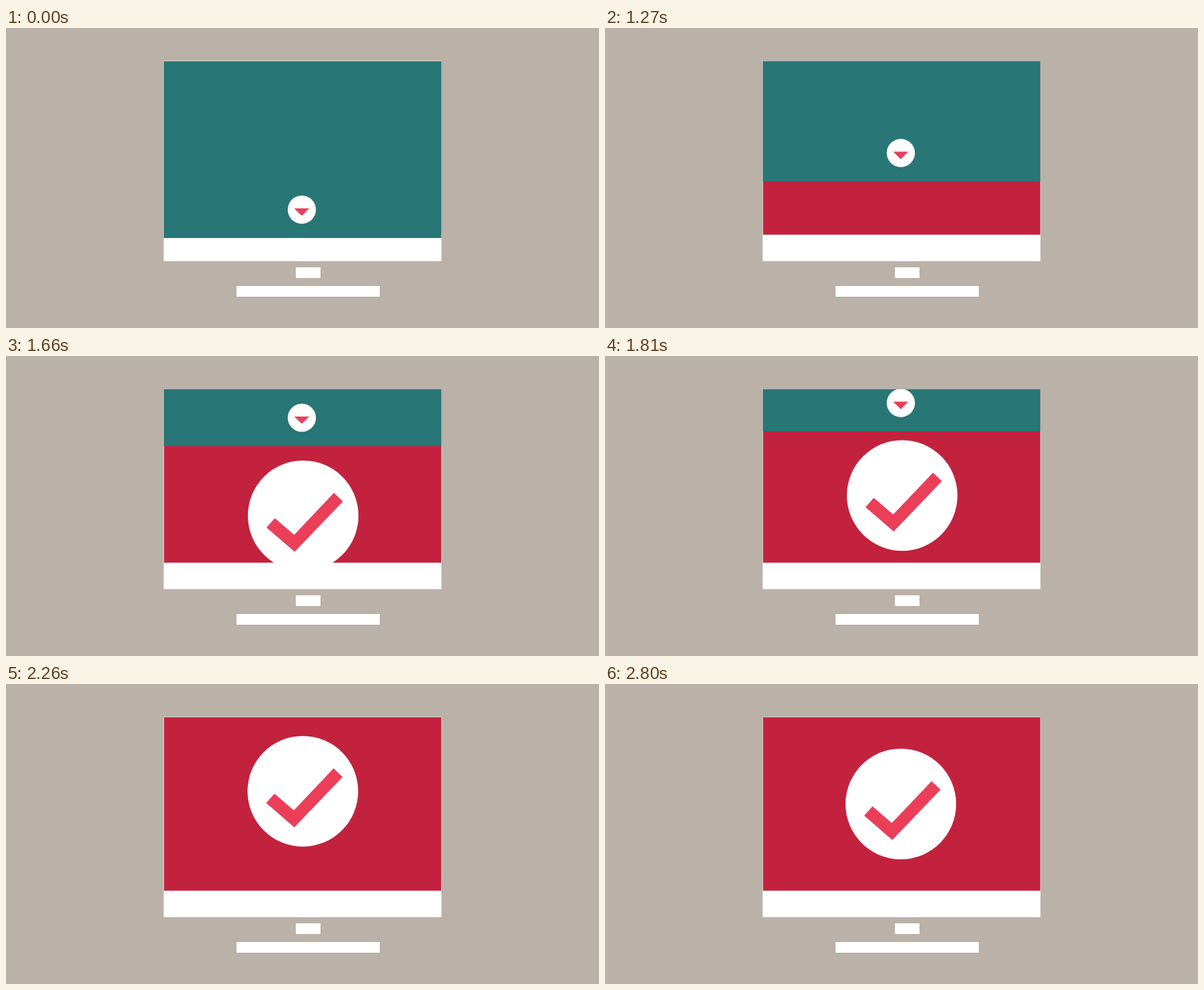
These frames come from a looping animation (890x450 px, 3590 ms). An HTML page:

```html
<!DOCTYPE html>
<html lang="en">
<head>
<meta charset="utf-8">
<title>Sliding screen</title>
<style>
  html, body { margin: 0; width: 100%; height: 100%; overflow: hidden; background: #bab1a8; }
  svg { display: block; }
</style>
</head>
<body>
<svg width="890" height="450" viewBox="0 0 890 450">
  <clipPath id="screen"><rect x="236.6" y="49.7" width="416.9" height="300"/></clipPath>
  <g fill="#fff">
    <rect x="236.6" y="49.7" width="416.9" height="300"/>
    <rect x="435" y="359" width="37" height="16"/>
    <rect x="346" y="387" width="215" height="16"/>
  </g>
  <g clip-path="url(#screen)">
    <rect x="237.2" y="50" width="416.3" height="260" fill="#c2223d"/>
    <g id="badge">
      <circle r="83" fill="#fff"/>
      <path d="M-55 17.6L-42.6 3.5L-13.5 28.6L46.2 -34.3L59.6 -21.5L-12.8 54Z" fill="#eb3e59"/>
    </g>
    <g id="panel">
      <rect x="236.6" y="50" width="417" height="265" fill="#287676"/>
      <circle cx="444" cy="272.5" r="21.2" fill="#fff"/>
      <path d="M432.5 270.5H455.2L443.9 281.7Z" fill="#eb3e59"/>
    </g>
  </g>
</svg>
<script>
  const LOOP = 3590, START = 1030, TICK = 30, LAST = 59;
  const badge = document.getElementById('badge');
  const panel = document.getElementById('panel');

  // Rows are [tick, values...], joined by straight lines.
  const panelKeys = [[0, 0], [14, -148.8], [40, -264.2], [41, -268]];
  const badgeKeys = [[14, 446, 282.2], [35, 446, 154.5], [LAST, 444, 180]];

  function sample(keys, tick) {
    if (tick <= keys[0][0]) return keys[0].slice(1);
    for (let i = 1; i < keys.length; i++) {
      const a = keys[i - 1], b = keys[i];
      if (tick <= b[0]) {
        const p = (tick - a[0]) / (b[0] - a[0]);
        return a.slice(1).map((v, j) => v + (b[j + 1] - v) * p);
      }
    }
    return keys[keys.length - 1].slice(1);
  }

  function draw(time) {
    const tick = Math.max(0, Math.min(LAST, Math.floor((time % LOOP - START) / TICK)));
    const [slide] = sample(panelKeys, tick);
    const [x, y] = sample(badgeKeys, tick);
    panel.setAttribute('transform', `translate(0 ${slide})`);
    badge.setAttribute('transform', `translate(${x} ${y})`);
    badge.setAttribute('visibility', tick < 14 ? 'hidden' : 'visible');
  }

  const origin = performance.now();
  function run() {
    draw(performance.now() - origin);
    requestAnimationFrame(run);
  }
  run();
</script>
</body>
</html>
```
